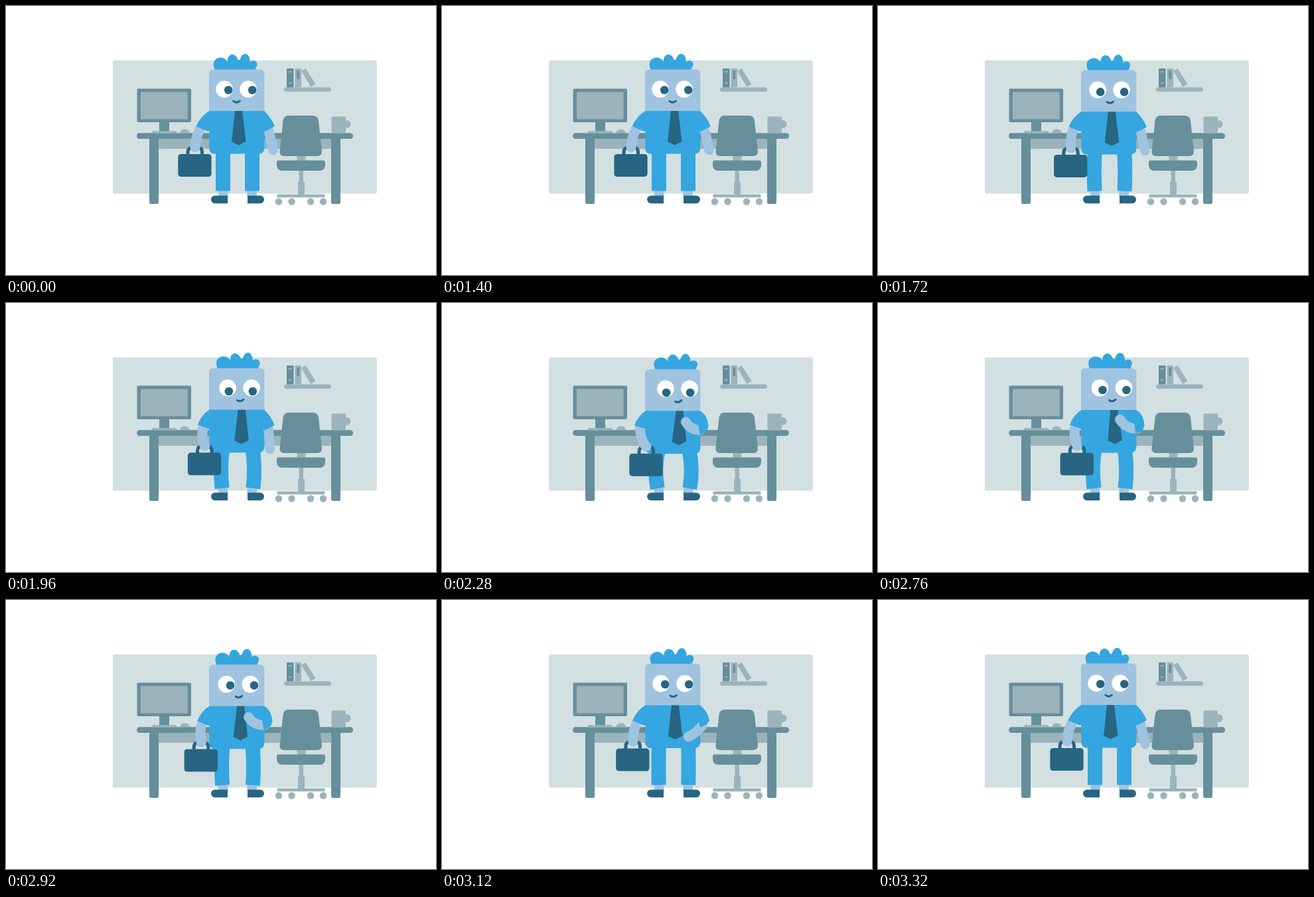
Animation, 648 px wide and 405 px high, one loop 3.36 s. Source, as an HTML page with a canvas:

```html
<!DOCTYPE html>
<html lang="en">
<head>
<meta charset="utf-8">
<title>Office worker</title>
<style>
html, body { margin: 0; width: 648px; height: 405px; overflow: hidden; background: #fff; }
canvas { display: block; }
</style>
</head>
<body>
<canvas id="stage" width="648" height="405"></canvas>
<script>
const ctx = document.getElementById('stage').getContext('2d');
const LOOP = 3360, STEP = 40, MOVE_START = 1400, MOVE_TIME = 1940;
const WALL = '#d3e0e1', GREY = '#668f9b', PALE = '#9bb4bb';
const BLUE = '#35a6e0', SKIN = '#a0c3e0', NAVY = '#276583';

const mix = (a, b, k) => a + (b - a) * k;
const ease = (from, to, t) => {
  const u = Math.min(1, Math.max(0, (t - from) / (to - from)));
  return u * u * (3 - 2 * u);
};

function rect(color, x, y, w, h, r = 0) {
  ctx.fillStyle = color;
  ctx.beginPath();
  ctx.roundRect(x, y, w, h, r);
  ctx.fill();
}
function oval(color, x, y, rx, ry = rx, turn = 0) {
  ctx.fillStyle = color;
  ctx.beginPath();
  ctx.ellipse(x, y, rx, ry, turn, 0, 7);
  ctx.fill();
}
function fill(color, path) {
  ctx.fillStyle = color;
  ctx.fill(new Path2D(path));
}
function line(color, width, path, cap = 'round') {
  ctx.strokeStyle = color;
  ctx.lineWidth = width;
  ctx.lineCap = cap;
  ctx.stroke(new Path2D(path));
}
function shifted(x, y, draw) {
  ctx.save();
  ctx.translate(x, y);
  draw();
  ctx.restore();
}

function drawOffice() {
  rect(WALL, 161, 82, 398, 200.5, 3);

  // Shelf and books
  rect(PALE, 419, 122.5, 71, 6.5, 3.2);
  rect(GREY, 423, 94, 10.5, 28.5, 1);
  rect(PALE, 426, 98, 4.5, 2);
  rect(PALE, 426, 115, 4.5, 2);
  rect(PALE, 435.5, 94, 9.5, 28.5, 1);
  rect(GREY, 438.5, 97, 3.5, 13);
  fill(PALE, 'M445 98 L451.5 94 L466.5 117.5 L459.5 122Z');

  // Desk
  rect(PALE, 228, 199, 264, 16);
  rect(GREY, 216, 196, 14, 102, 2.5);
  rect(GREY, 490, 196, 14, 102, 2.5);
  rect(GREY, 197, 191.3, 326, 8.7, 4.3);

  // Monitor, mouse and mug
  rect(GREY, 231, 174, 15, 15);
  rect(PALE, 220, 188.3, 37, 3.2, 1);
  rect(GREY, 197.5, 124.5, 81.5, 50.5, 2);
  rect(PALE, 203, 129.5, 70.5, 41);
  fill(PALE, 'M262 191.3 Q263 185.5 269.5 185.5 Q276 185.5 277 191.3Z');
  rect(PALE, 490.5, 166.5, 21.5, 25, [1, 1, 3, 3]);
  oval(PALE, 513.5, 178, 6);

  // Chair
  rect(PALE, 438.5, 224, 13, 10);
  fill(GREY, 'M426 165 H462 Q470 165 471 173 L476 219 Q476 226 469 226 H419 Q412 226 412.5 219 L417.5 173 Q418.5 165 426 165Z');
  rect(PALE, 441.5, 247, 6.5, 20);
  rect(PALE, 440, 265, 10, 20);
  rect(GREY, 408, 232.5, 73, 15.5, [3, 3, 8, 8]);
  rect(PALE, 408.5, 283.5, 72, 4.7, 1);
  for (const x of [411, 430.5, 459, 478]) oval(PALE, x, 294.5, 5.2);
}

function drawLeg(k) {
  const x = mix(327, 324.7, k);
  line(SKIN, 14.5, `M${mix(327.5, 326, k)} 276 L327.5 287`, 'butt');
  line(BLUE, 22, `M${mix(327, 326, k)} ${mix(216, 220, k)} Q${mix(327, 319, k)} 250 ${x} ${mix(278.5, 279.3, k)}`, 'butt');
  rect(NAVY, 309, 285.5, 25, 11.7, [6, 0, 0, 6]);
}

function drawHead(k, look) {
  shifted(6.8 * k, 4.6 * k, () => {
    oval(BLUE, 323.5, 87.7, 10.8, 10.3);
    oval(BLUE, 342, 84, 8.3, 11, -0.2);
    oval(BLUE, 360, 84, 7.8, 12, 0.05);
    oval(BLUE, 372.5, 88, 6, 6, 0);
    fill(BLUE, 'M313 89 Q313 93 315 96.5 H375 Q377 94 377 91 L360 80 L342 82Z');
  });
  rect(SKIN, 306, mix(95.5, 99.8, k), 83.3, 63.5, [6, 6, 0, 0]);
  for (const x of [329, 365]) {
    const eyeX = x + 8.2 * k, eyeY = 125.3 + 4 * k;
    oval('#fff', eyeX, eyeY, 12.8);
    oval(NAVY, eyeX + mix(6.2, 1.1, look), eyeY + mix(1.2, 5.8, look), 6.3);
  }
  shifted(347.5 + 9 * k, 143.5 + 4.2 * k, () => {
    ctx.rotate(-0.22 * k);
    line(NAVY, 3, 'M-4.8 -0.3 Q0 3.6 4.8 -0.3');
  });
}

function drawTie(k, tug) {
  const top = 7.8 * k, tip = 6.8 * k + 6 * tug;
  fill(NAVY, `M${345 + top} 158 H${356 + top} L${361.5 + tip} ${204 - 2 * tug}
    L${350.5 + tip} 209.5 L${340 + tip} ${204.5 - tug}Z`);
}

function drawCaseArm(k) {
  shifted(23.5 * k, 3.8 * k, () => {
    line(NAVY, 5, 'M274 225 V220 Q274 213.5 280 213.5 H290 Q295.5 213.5 295.5 220 V225', 'butt');
    rect(NAVY, 259.3, 223, 50.3, 34, 4.5);
  });
  line(SKIN, 15, `M${mix(297, 299, k)} ${mix(178, 181, k)}
    Q${mix(286, 297, k)} ${mix(192, 205, k)} ${mix(285, 308.5, k)} ${mix(212.8, 216.5, k)}`);
  const p = (x, y, dx, dy) => `${x + dx * k} ${y + dy * k}`;
  fill(BLUE, `M${p(314, 158, 0, 4.5)} H306.5 Q${p(294, 165, 2, 4)} ${p(286.5, 181, 3.7, 3.3)}
    L${p(304, 188.8, 3, 1)} L${p(314, 186, 0, 4)}Z`);
}

function drawFreeArm(raise, tug, k) {
  const elbowX = mix(396, 390, raise), elbowY = mix(188, 186.5, raise);
  const angle = mix(77, 207, raise) * Math.PI / 180;
  const length = mix(29.5, 26.5, raise);
  const handX = elbowX + Math.cos(angle) * length - 5 * tug + (k - 0.7) * 3 * raise;
  const handY = elbowY + Math.sin(angle) * length - 6 * tug;
  // Bow the forearm to the outside of the bend
  const bow = 8 * raise;
  const midX = (elbowX + handX) / 2 + Math.sin(angle) * bow;
  const midY = (elbowY + handY) / 2 - Math.cos(angle) * bow;
  line(SKIN, 14.8, `M${elbowX} ${elbowY} Q${midX} ${midY} ${handX} ${handY}`);

  const p = (x, y, x2, y2) => `${mix(x, x2, raise)} ${mix(y, y2, raise)}`;
  fill(BLUE, `M383 158 H389 Q${p(399, 167, 400, 164)} ${p(405, 181, 401.5, 181)}
    Q${p(397, 186, 400.5, 191)} ${p(389, 189, 388.5, 193.5)}Z`);
}

function drawWorker(t) {
  const phase = Math.min(1, Math.max(0, (t - MOVE_START) / MOVE_TIME));
  const k = (1 - Math.cos(phase * 2 * Math.PI)) / 2;
  const look = ease(1400, 2120, t) - ease(2400, 3040, t);
  const raise = ease(1900, 2280, t) - ease(2920, 3310, t);
  const tug = ease(2290, 2540, t) - ease(2580, 2880, t);

  drawLeg(k);
  ctx.save();
  ctx.translate(698, 0);
  ctx.scale(-1, 1);
  drawLeg(k);
  ctx.restore();

  drawHead(k, look);
  shifted(0, 4.5 * k, () => {
    rect(BLUE, 306.3, 158, 83, 64.5, [0, 0, 8, 8]);
    drawTie(k, tug);
    drawFreeArm(raise, tug, k);
  });
  drawCaseArm(k);
}

function frame() {
  const t = Math.floor(performance.now() % LOOP / STEP) * STEP;
  ctx.clearRect(0, 0, 648, 405);
  drawOffice();
  drawWorker(t);
  requestAnimationFrame(frame);
}
frame();
</script>
</body>
</html>
```
